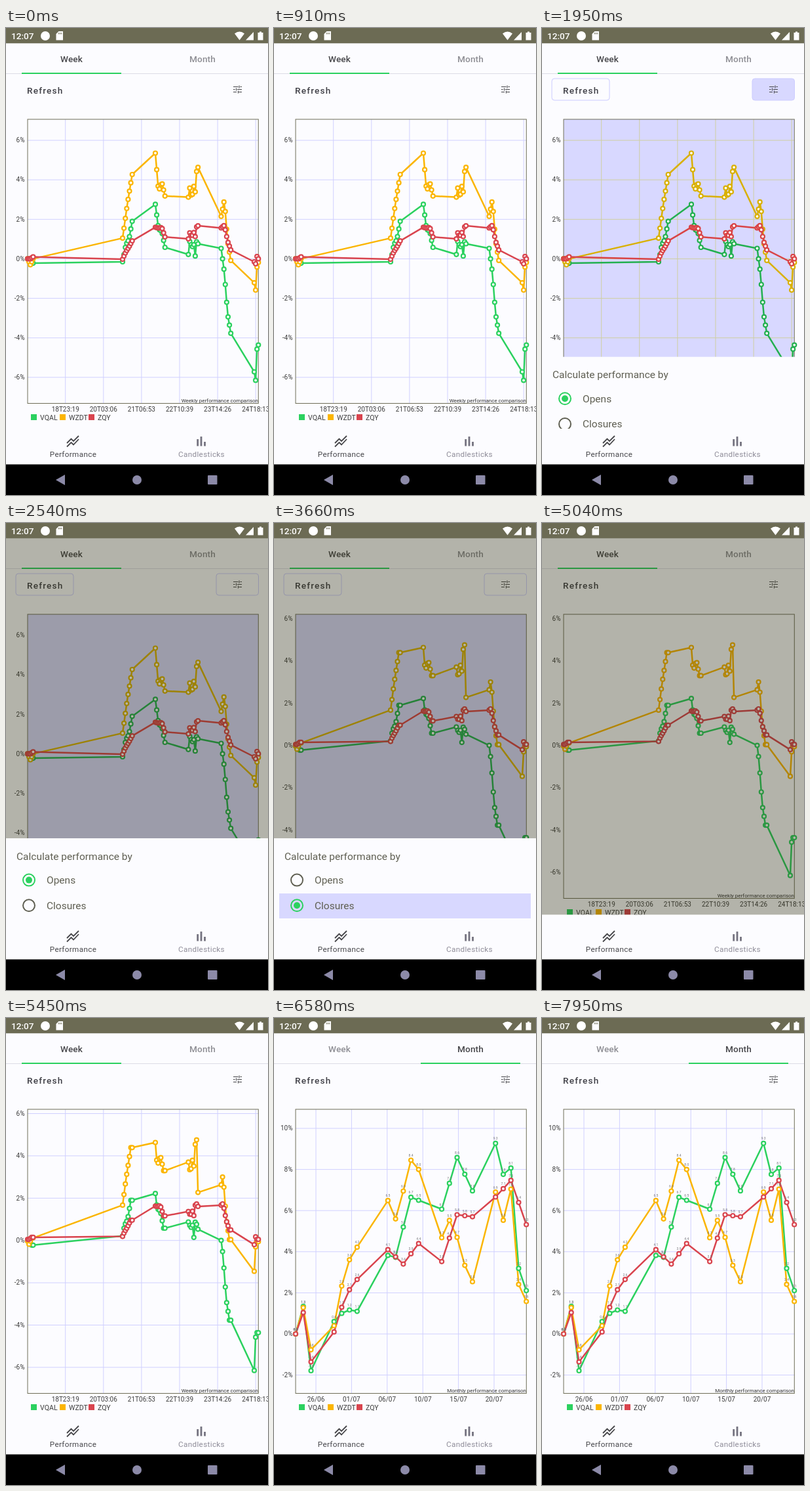
Write an HTML page that moves like this. It is 400 px wide and 711 px high and loops after 8000 ms.

```html
<!DOCTYPE html>
<html lang="en">
<head>
<meta charset="utf-8">
<title>Performance chart</title>
<style>
html, body { margin: 0; width: 100%; height: 100%; overflow: hidden; background: #fcfcff; }
svg { display: block; width: 100%; height: 100%; font-family: Roboto, sans-serif; }
.grid { stroke: var(--grid); fill: none; }
.axis { font-size: 10px; fill: #3c3c3c; }
.tab { font-size: 13.6px; font-weight: 500; letter-spacing: .1px; text-anchor: middle; }
.nav { font-size: 11.7px; letter-spacing: .35px; text-anchor: middle; }
.sheet { font-size: 15.5px; fill: #5f5f52; }
.line { fill: none; stroke-width: 2.5; stroke-linejoin: round; }
.mark { fill: #fff; stroke-width: 2.2; }
.val { font-size: 5px; fill: #74747a; text-anchor: middle; }
.mid { text-anchor: middle; }
.end { text-anchor: end; }
</style>
</head>
<body>
<svg id="stage" viewBox="0 0 400 711" xmlns="http://www.w3.org/2000/svg"></svg>
<script>
const LOOP = 8000;
const BOX = { l: 33, t: 139, r: 385.3, b: 571.5 };
const DAY = 11.74, HOUR = 2.1;
const names = ['VQAL', 'WZDT', 'ZQY'];
const bright = [[43, 209, 95], [251, 181, 0], [217, 68, 78]];
const dim = [[35, 176, 80], [217, 176, 0], [217, 68, 70]];

// Spreads a few key values evenly over n points
const spread = (keys, n) => Array.from({ length: n }, (_, i) => {
  const p = i / (n - 1) * (keys.length - 1), k = Math.min(Math.floor(p), keys.length - 2);
  return keys[k] + (keys[k + 1] - keys[k]) * (p - k);
});
const places = (runs, step) => runs.flatMap(r => Array.from({ length: r.n }, (_, i) => r.x + i * step));

// Trading sessions; carry: the last close equals the next session's open
const sessions = [
  { x: 33, n: 5 }, { x: 178, n: 8 }, { x: 228, n: 8 },
  { x: 278.4, n: 8, wave: 1, carry: true }, { x: 328.5, n: 8 }, { x: 379, n: 4 }
];
const hourly = [
  { wave: .28, drift: 0, keys: [[0, 0, -.22], [-.15, .7, 1, 1.9], [2.76, 1.5, 1.4, .58],
    [.5, .85, .35, .85], [.53, -.7, -2.8, -3.77], [-5.72, -6.15, -4.57, -4.36]] },
  { wave: .28, drift: .12, keys: [[0, -.3, 0], [1.05, 2.8, 4.27], [5.35, 3.4, 3.9, 3.18],
    [3.4, 3.3, 3.5, 4.72], [2.15, 3, .9, -.08], [-1.21, -1.58, -.42, -.18]] },
  { wave: .15, drift: .05, keys: [[0, 0, .1], [-.02, .35, .6, .91], [1.6, 1.55, 1.6, 1.11],
    [1.16, 1.25, 1.2, 1.72], [1.56, 1.7, .9, .45], [-.15, -.25, .12, 0]] }
];
const opens = hourly.map(h => sessions.flatMap((s, j) =>
  spread(h.keys[j], s.n).map((v, i) => v - (s.wave || 0) * h.wave * Math.cos(i * Math.PI / 1.25))));

// Each hour closes where the next one opens
const held = sessions.flatMap(s => Array.from({ length: s.n }, (_, i) => i === s.n - 1 && !s.carry));
const closes = opens.map((vs, k) => vs.map((v, i) => (held[i] ? v : vs[i + 1]) + hourly[k].drift));

const weeks = [[0, 3], [5, 4], [12, 5], [19, 5], [26, 5]].map(([d, n]) => ({ x: 33 + d * DAY, n }));
const daily = [
  [[0, 1.34, -1.79], [.6, 1.2, 1.1], [3.82, 3.7, 6.7, 6.5], [6.07, 8.58, 6.96], [9.27, 7.76, 8.07, 3.19, 2.11]],
  [[0, 1.28, -.77], [.4, 3.3, 4.22], [6.49, 5.3, 8.6, 8], [4.68, 5.8, 3.6, 2.54], [6.9, 5.53, 7.04, 2.41, 1.58]],
  [[0, 1.04, -1.36], [.1, 1.9, 2.65], [4.1, 3.4, 4.4], [3.52, 5.8, 5.7], [6.66, 7.47, 5.32]]
].map(keys => weeks.flatMap((w, j) => spread(keys[j], w.n)));

const weekly = {
  title: 'Weekly performance comparison', xs: places(sessions, HOUR), top: 6, tickX: 90.7, tickStep: 58.1,
  ticks: ['18T23:19', '20T03:06', '21T06:53', '22T10:39', '23T14:26', '24T18:13']
};
const charts = {
  opens: { ...weekly, topY: 171, step: 60.15, series: opens },
  closures: { ...weekly, topY: 145.5, step: 64.4, series: closes },
  month: {
    title: 'Monthly performance comparison', xs: places(weeks, DAY), top: 10, tickX: 64, tickStep: 54.4,
    ticks: ['26/06', '01/07', '06/07', '10/07', '15/07', '20/07'],
    topY: 168, step: 62.6, series: daily, labels: true
  }
};

const text = (x, y, s, cls, extra = '') => `<text x="${x}" y="${y}" class="${cls}" ${extra}>${s}</text>`;

function chartMarkup(id, c) {
  let out = '', marks = '', vals = '';
  for (let i = 0; i < 7; i++) {
    const y = c.topY + i * c.step;
    out += `<path class="grid" d="M${BOX.l} ${y}H${BOX.r}"/>` + text(28.5, y + 3.3, c.top - 2 * i + '%', 'axis end');
  }
  c.ticks.forEach((s, i) => {
    const x = c.tickX + i * c.tickStep;
    out += `<path class="grid" d="M${x} ${BOX.t}V${BOX.b}"/>` + text(x, 584, s, 'axis mid');
  });
  out += `<rect x="${BOX.l}" y="${BOX.t}" width="${BOX.r - BOX.l}" height="${BOX.b - BOX.t}" fill="none" stroke="#6f6e58"/>`;
  out += text(385, 570, c.title, 'end', 'font-size="8" fill="#333"');
  const zero = c.topY + c.top / 2 * c.step;
  c.series.forEach((vs, k) => {
    const stroke = `style="stroke:var(--c${k})"`;
    const pts = vs.map((v, i) => [c.xs[i].toFixed(1), (zero - v * c.step / 2).toFixed(1)]);
    out += `<polyline class="line" ${stroke} points="${pts.join(' ')}"/>`;
    pts.forEach(([x, y], i) => {
      marks += `<circle class="mark" cx="${x}" cy="${y}" r="3" ${stroke}/>`;
      if (c.labels) vals += text(x, y - 5.5, vs[i].toFixed(1), 'val');
    });
  });
  return `<g id="${id}">${out}${vals}${marks}</g>`;
}

const legend = names.map((n, i) => {
  const x = 38 + 44 * i;
  return `<rect x="${x}" y="588" width="9" height="9" style="fill:var(--c${i})"/>` +
    text(x + 14, 596.5, n, '', 'font-size="10.6" fill="#3c3c3c"');
}).join('');

const button = (id, x, w) => `<rect id="${id}" x="${x}" y="77" width="${w}" height="33" rx="4" fill="none"/>`;
const radio = (id, y, label) => `<circle cx="35" cy="${y}" r="9" fill="none" stroke-width="2" id="${id}Ring"/>
  <circle cx="35" cy="${y}" r="5" fill="#2bd15f" id="${id}Dot"/>` + text(62, y + 5.3, label, 'sheet');

document.getElementById('stage').innerHTML = `
<rect width="400" height="711" fill="#fcfcff"/>
<path d="M0 69.5H400" stroke="#dcdce6"/>
${text(100, 52, 'Week', 'tab', 'id="week"')}${text(300, 52, 'Month', 'tab', 'id="monthTab"')}
<rect id="bar" y="68" width="152" height="2" fill="#2bd15f"/>
${button('btnA', 15, 88)}${button('btnB', 321, 64.5)}
${text(32, 100, 'Refresh', '', 'font-size="13.6" font-weight="500" letter-spacing="1.2" fill="#3f3f46"')}
<path d="M347 89.5H354.5M357.5 89.5H360M356 87.5V91.5M347 93.5H349.5M353 93.5H360M351.5 91.5V95.5M347 97.5H352M355.5 97.5H360M354.5 95.5V99.5" stroke="#46464a" stroke-width="1.1"/>
<rect id="tint" x="33" y="139" width="352" height="432" fill="#d8d8ff"/>
${Object.entries(charts).map(([id, c]) => chartMarkup(id, c)).join('')}
${legend}
<rect id="scrim" y="23" width="400" height="642" fill="rgb(45,45,12)"/>
<g id="sheet">
  <rect width="400" height="231" fill="#fcfcff"/>
  <rect id="row" x="8" y="84" width="384" height="38" fill="#d8d8ff"/>
  ${text(16, 32.5, 'Calculate performance by', 'sheet')}
  ${radio('open', 63.6, 'Opens')}${radio('close', 102.3, 'Closures')}
</g>
<rect y="610" width="400" height="55" fill="#fcfcff"/>
<path d="M93 632L99.5 625.5L103 629L111 621M93 637.5L99.5 631L103 634.5L111 626" fill="none" stroke="#46464a" stroke-width="1.8"/>
${text(102.5, 653, 'Performance', 'nav', 'fill="#46464a"')}
<path d="M292.7 626V636.5M298 622V636.5M303.5 630V636.5" stroke="#74727f" stroke-width="2.8"/>
${text(298.5, 653, 'Candlesticks', 'nav', 'fill="#8e8c98"')}
<rect width="400" height="23.3" fill="#6c6b54"/>
${text(8, 17, '12:07', '', 'font-size="13.6" font-weight="500" fill="#fff"')}
<g fill="#fff">
  <circle cx="60" cy="12" r="7"/>
  <path d="M80.5 5H87V18.5H76.5V9Z"/>
  <path d="M349 8.5Q356.5 2.5 364 8.5L356.5 18.5Z"/>
  <path d="M366 18.5H378V6Z"/>
  <path d="M384.5 7H387V5.5H390V7H392.5V18.5H384.5Z"/>
</g>
<path d="M80.3 7V9.5M82.5 7V9.5M84.7 7V9.5" stroke="#6c6b54"/>
<rect y="664.4" width="400" height="47" fill="#000"/>
<g fill="#8c8aa8">
  <path d="M76 688L90 680V696Z"/>
  <circle cx="200" cy="688" r="7"/>
  <rect x="308" y="681" width="14.5" height="14" rx="1"/>
</g>`;

const $ = id => document.getElementById(id);
const set = (id, attrs) => { for (const k in attrs) $(id).setAttribute(k, attrs[k]); };
const ramp = (t, a, b) => Math.min(1, Math.max(0, (t - a) / (b - a)));
const ease = p => p * p * (3 - 2 * p);
const mix = (a, b, p) => `rgb(${a.map((v, i) => Math.round(v + (b[i] - v) * p))})`;

// The slide pauses once on the way in and once on the way out
function sheetTop(t) {
  if (t >= 1950 && t < 2080) t = 1950;
  if (t >= 5040 && t < 5120) t = 5040;
  return 665 - 185 * (ease(ramp(t, 1752, 2002)) - ease(ramp(t, 4864, 5164)));
}

function render(t) {
  const month = t >= 5750, closed = t >= 3660;
  const view = t >= 5830 ? 'month' : closed ? 'closures' : 'opens';
  for (const id in charts) set(id, { display: id === view ? 'inline' : 'none' });

  const tint = ramp(t, 1752, 1950) - ramp(t, 4500, 4950);
  const scrim = ramp(t, 2080, 2330) - ramp(t, 5120, 5250);
  const root = $('stage').style;
  bright.forEach((c, i) => root.setProperty('--c' + i, mix(c, dim[i], tint)));
  const lit = mix([208, 208, 255], [207, 207, 160], tint);
  root.setProperty('--grid', scrim > 0 ? `rgba(208,208,255,${1 - scrim})` : lit);
  set('tint', { opacity: tint });
  set('scrim', { opacity: scrim * .35 });

  const press = ramp(t, 1700, 1900) - ramp(t, 2080, 2400);
  const edge = `rgba(204,204,255,${tint})`;
  set('btnA', { stroke: edge });
  set('btnB', { stroke: edge, fill: `rgba(216,216,255,${press})` });

  const y = sheetTop(t);
  set('sheet', { transform: `translate(0 ${y.toFixed(2)})`, display: y < 664.9 ? 'inline' : 'none' });
  set('row', { opacity: closed ? 1 - ramp(t, 3750, 4150) : 0 });
  ['open', 'close'].forEach((id, i) => {
    const on = closed === (i === 1);
    set(id + 'Ring', { stroke: on ? '#2bd15f' : '#5f5f52' });
    set(id + 'Dot', { display: on ? 'inline' : 'none' });
  });

  set('bar', { x: 24 + 200 * ease(ramp(t, 5750, 6000)) });
  set('week', { fill: month ? '#8e8e94' : '#46464a' });
  set('monthTab', { fill: month ? '#46464a' : '#8e8e94' });
}

const start = performance.now();
function tick() {
  render((performance.now() - start) % LOOP);
  requestAnimationFrame(tick);
}
tick();
</script>
</body>
</html>
```
